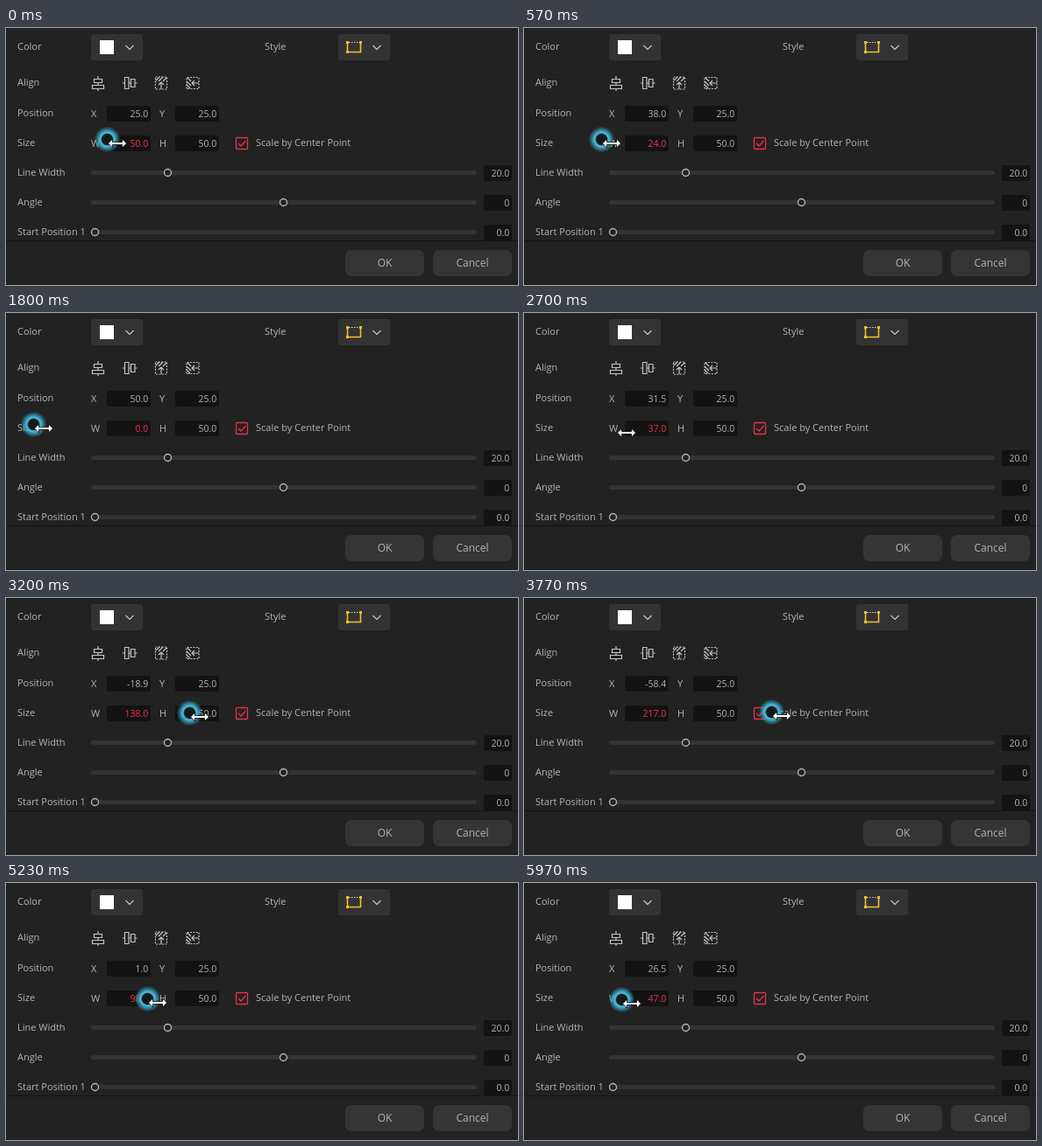
Recreate the animation shown at these times as an HTML page. Size 584x294 px, loop 6010 ms.

```html
<!DOCTYPE html>
<html lang="en">
<head>
<meta charset="utf-8">
<title>Shape settings</title>
<style>
  html, body { margin: 0; width: 100%; height: 100%; overflow: hidden; background: #222; }
  svg { display: block; width: 584px; height: 294px; }
  text { font: 11px "Open Sans", "Noto Sans", sans-serif; fill: #b4b4b4; }
  .value { font-size: 10.5px; text-anchor: end; }
  .button { font-size: 12px; text-anchor: middle; }
  .active { fill: #f0324f; }
  .line { fill: none; stroke: #c4c4c4; stroke-width: 1.2; }
  .yellow { fill: none; stroke: #f0c02c; stroke-width: 1.6; }
</style>
</head>
<body>
<svg id="stage" viewBox="0 0 584 294">
  <defs>
    <radialGradient id="glow">
      <stop offset="0" stop-color="#141719"/>
      <stop offset=".4" stop-color="#14191b"/>
      <stop offset=".5" stop-color="#4fc0dc"/>
      <stop offset=".62" stop-color="#3fb2d0" stop-opacity=".9"/>
      <stop offset="1" stop-color="#2c9fbe" stop-opacity="0"/>
    </radialGradient>
    <g id="fit">
      <rect class="line" x="-6.5" y="-7" width="13" height="14" stroke-dasharray="2 1.4"/>
      <path class="line" d="M-6-3l4-4M-3-2l5-5M2-2l4-4M0 7V-1M-3 2L0-1L3 2"/>
    </g>
  </defs>
  <rect width="584" height="294" fill="#222"/>
  <g id="panel"></g>
  <g id="icons">
    <rect x="107" y="14" width="16" height="16" fill="#fff"/>
    <path class="line" d="M136.5 20l4.5 4.5 4.5-4.5M418.500 20l4.500 4.500 4.500-4.500"/>
    <path class="yellow" d="M389.500 18V27.500H404.500V18"/>
    <path d="M391 16.500H404" fill="none" stroke="#ddd" stroke-dasharray="1.500 1.500"/>
    <path d="M388 15h3v3h-3zM403 15h3v3h-3zM388 26h3v3h-3z" fill="#f0c02c"/>
    <path class="line" d="M105 55V58M105 62V65M105 69V72M100.500 58.500h9v4h-9zM98.500 65.500h13v4h-13z"/>
    <path class="line" d="M133 63H136M140 63H143M147 63H149.500M135.500 56.500h4.500v13h-4.500zM142.500 58.500h4.500v9h-4.500z"/>
    <use href="#fit" x="177" y="63"/>
    <use href="#fit" transform="translate(213 63) rotate(-90)"/>
    <rect x="262.500" y="125.500" width="13" height="13" rx="1" fill="none" stroke="#e6304c" stroke-width="1.300"/>
    <path d="M265 132l3 3 5.500-6" fill="none" stroke="#e6304c" stroke-width="1.400"/>
  </g>
  <circle id="ring" r="15" fill="url(#glow)"/>
  <path id="cursor" d="M-10.500 0L-5.500-5V-1.500H5.500V-5L10.500 0L5.500 5V1.500H-5.500V5Z"
        fill="#fff" stroke="#000" stroke-width=".8"/>
</svg>
<script>
const LOOP = 6010;
const VALUE_DELAY = 25;
const ZERO_X = 77; // pointer position at which the width reaches zero
const $ = id => document.getElementById(id);
const panel = $("panel");

function add(tag, attrs, content = "") {
  const el = document.createElementNS("http://www.w3.org/2000/svg", tag);
  for (const name in attrs) el.setAttribute(name, attrs[name]);
  el.textContent = content;
  return panel.appendChild(el);
}
const label = (x, y, content, cls = "") => add("text", { x, y, class: cls }, content);
const box = (x, y, width, height, rx, fill) => add("rect", { x, y, width, height, rx, fill });

function field(x, y, width, content, cls = "") {
  box(x, y, width, 18, 2, "#131313");
  return label(x + width - 2.7, y + 13, content, "value " + cls);
}

function slider(y, name, knob, content) {
  label(13, y + 4, name);
  box(97, y - 2, 440, 5, 2.5, "#333");
  add("circle", { cx: knob, cy: y + .5, r: 4, fill: "#222", stroke: "#b4b4b4", "stroke-width": 1.4 });
  field(545, y - 8, 32, content);
}

function button(x, name) {
  box(x, 254, 90, 30, 7, "#353535");
  label(x + 45, 273, name, "button");
}

label(13, 25, "Color");
label(295, 25, "Style");
box(97, 7, 59, 30, 3, "#333");
box(379, 7, 59, 30, 3, "#333");
label(13, 66, "Align");
label(13, 101, "Position");
label(97, 102, "X");
label(175, 102, "Y");
const posX = field(115, 89, 50, "25.0");
field(193, 89, 50, "25.0");
label(13, 135, "Size");
label(97, 136, "W");
label(175, 136, "H");
const sizeW = field(115, 123, 50, "50.0", "active");
field(193, 123, 50, "50.0");
label(285, 135, "Scale by Center Point");
slider(165, "Line Width", 184.5, "20.0");
slider(199, "Angle", 316.5, "0");
slider(233, "Start Position 1", 101.5, "0.0");
box(0, 243, 584, 51, 0, "#222");
box(0, 243, 584, 1, 0, "#141414");
button(387, "OK");
button(487, "Cancel");

// Smooth curve through [time, value] points that never overshoots.
function curve(points) {
  const slopes = points.slice(1).map(([t, v], i) => (v - points[i][1]) / (t - points[i][0]));
  const tangents = points.map((_, i) => {
    const before = slopes[Math.max(i - 1, 0)];
    const after = slopes[Math.min(i, slopes.length - 1)];
    return before * after > 0 ? 2 * before * after / (before + after) : 0;
  });
  return t => {
    let i = 0;
    while (i < slopes.length - 1 && t >= points[i + 1][0]) i++;
    const [t0, v0] = points[i], [t1, v1] = points[i + 1];
    const d = t1 - t0, u = Math.min(1, Math.max(0, (t - t0) / d)), w = 1 - u;
    return v0 * w * w * (1 + 2 * u) + v1 * u * u * (3 - 2 * u)
      + d * u * w * (tangents[i] * w - tangents[i + 1] * u);
  };
}

const pointerX = curve([[0, 127], [1070, 76.2], [1800, 43], [1950, 41], [2000, 41], [2700, 117],
  [3700, 293.8], [3770, 294.2], [3860, 294.2], [5230, 173.5], [5970, 123.5], [6010, 123]]);
const pointerY = curve([[0, 131.5], [1070, 132], [1800, 132], [2700, 137], [3770, 135],
  [5230, 137], [5970, 138], [6010, 138]]);

function draw(t) {
  const x = Math.round(pointerX(t)), y = Math.round(pointerY(t));
  const width = Math.max(0, Math.round(pointerX(Math.max(0, t - VALUE_DELAY)) - ZERO_X));
  sizeW.textContent = width.toFixed(1);
  posX.textContent = (Math.trunc(500 - width * 5 + .001) / 10).toFixed(1);
  $("cursor").setAttribute("transform", `translate(${x} ${y})`);
  $("ring").setAttribute("transform", `translate(${x - 11.5} ${y - 4.5})`);
  $("ring").style.display = t >= 2640 && t < 2770 ? "none" : "";
}

const start = performance.now();
function tick() {
  draw((performance.now() - start) % LOOP);
  requestAnimationFrame(tick);
}
tick();
</script>
</body>
</html>
```
